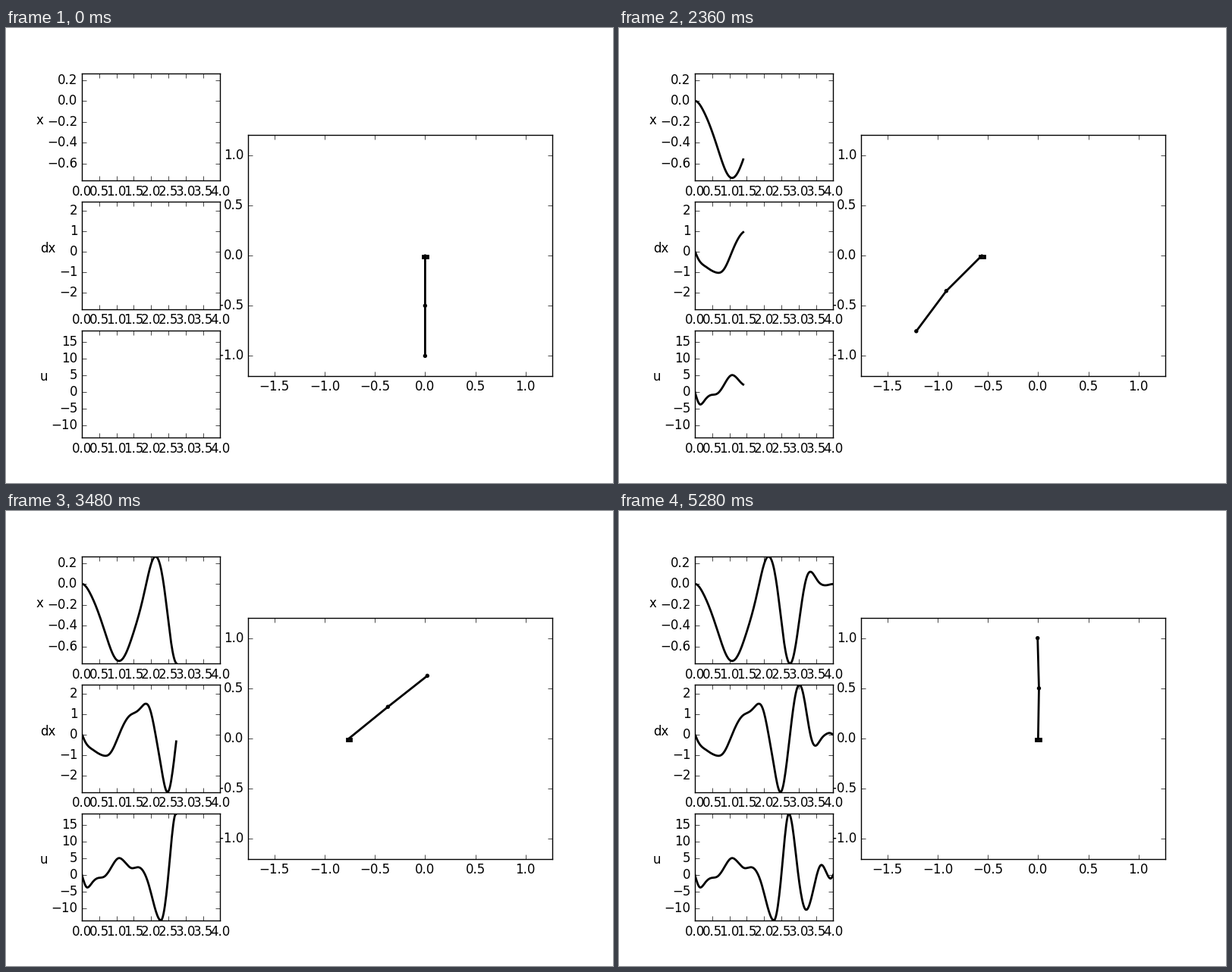
A matplotlib script that plays this animation: 800x600 px, repeating every 5.76 s.

```python
import numpy as np
import matplotlib.pyplot as plt
from matplotlib.animation import FuncAnimation
from matplotlib.patches import Circle, Rectangle

plt.style.use("classic")
plt.rcParams.update({"figure.facecolor": "white", "font.family": "DejaVu Sans"})

FRAMES, INTERVAL = 144, 40
START, LAST_STEP = 30, 85
END, N = 4.0, 201
ROD, GRAVITY = 0.5, 9.81
T, DT = np.linspace(0, END, N, retstep=True)


def sampler(times):
    """Matrix that reads a gridded signal at the given times."""
    return np.maximum(0, 1 - np.abs(np.subtract.outer(times, T)) / DT)


def smooth_curve(turns, passes, slopes, order, tolerance):
    """Curve of least bending (derivative of the given order) that turns at,
    passes through, or has a given slope at a few key points."""
    derive = np.gradient(np.eye(N), DT, axis=0)
    slopes = slopes + [(t, 0) for t, _ in turns]
    rows = [2e-4 * np.diff(np.eye(N), order, axis=0) / DT**order]
    goals = [np.zeros(N - order)]
    for points, operator, allowed in ((turns + passes, np.eye(N), tolerance),
                                      (slopes, derive, 7 * tolerance)):
        times, values = np.array(points).T
        rows.append(sampler(times) @ operator / allowed)
        goals.append(values / allowed)
    return np.linalg.lstsq(np.vstack(rows), np.concatenate(goals), rcond=None)[0]


def swing_up(acceleration):
    """Angles of both rods (0 = hanging) that obey the double pendulum
    equations on the moving cart and pass through a few key poses."""
    keys = np.array([(0, 0, 0), (0.8275, 0.095, 0.514),
                     (1.92, -0.236, -0.979), (2.7275, 2.254, 2.239),
                     (3.345, 3.366, 3.194), (4, 3.125, 3.168)])
    read = sampler(keys[:, 0])
    poses = keys[:, 1:].T
    push = acceleration[1:-1]

    def motion(q):
        return (q[..., 1:-1], (q[..., 2:] - q[..., :-2]) / (2 * DT),
                (q[..., 2:] - 2 * q[..., 1:-1] + q[..., :-2]) / DT**2)

    def misfit(q):
        a, va, acc_a = motion(q[..., 0, :])
        b, vb, acc_b = motion(q[..., 1, :])
        c, s = np.cos(a - b), np.sin(a - b)
        upper = (2 * acc_a + c * acc_b + s * vb**2
                 + 2 / ROD * (GRAVITY * np.sin(a) + push * np.cos(a)))
        lower = (acc_b + c * acc_a - s * va**2
                 + 1 / ROD * (GRAVITY * np.sin(b) + push * np.cos(b)))
        pose = (q @ read.T - poses) / 0.002
        rest = (q[..., [1, -1]] - q[..., [0, -2]]) / 0.004
        flat = q.shape[:-2] + (-1,)
        return np.concatenate([upper / 2, lower / 2, pose.reshape(flat),
                               rest.reshape(flat)], axis=-1)

    # Levenberg-Marquardt from straight lines between the poses.
    q = np.concatenate([np.interp(T, keys[:, 0], angle) for angle in poses])
    size, nudge, damping = 2 * N, 1e-6, 10.0
    error = misfit(q.reshape(2, N))
    jacobian = None
    for _ in range(60):
        if jacobian is None:
            moved = (q + nudge * np.eye(size)).reshape(size, 2, N)
            jacobian = (misfit(moved) - error).T / nudge
            normal, slope = jacobian.T @ jacobian, jacobian.T @ error
        step = np.linalg.solve(normal + damping * np.eye(size), -slope)
        trial = misfit((q + step).reshape(2, N))
        if trial @ trial < error @ error:
            q, error, jacobian = q + step, trial, None
            damping /= 5
            if np.abs(step).max() < 1e-4:
                break
        else:
            damping *= 4
    return q.reshape(2, N)


x = smooth_curve(
    turns=[(0, 0), (1.075, -0.737), (2.13, 0.264), (2.75, -0.762),
           (3.34, 0.118), (3.77, -0.012), (4, 0)],
    passes=[(0.83, -0.62), (1.92, 0.09)],
    slopes=[(0.3, -0.71), (0.62, -1.01), (1.4, 0.95), (1.8, 1.47),
            (2.48, -2.78), (3, 2.4), (3.5, -0.53)],
    order=4, tolerance=0.003)
dx = np.gradient(x, DT)
u = smooth_curve(
    turns=[(0.16, -3.8), (1.08, 5.05), (1.46, 2), (1.62, 2.3), (2.28, -13.7),
           (2.72, 18.4), (3.22, -10.5), (3.66, 3), (3.92, -1.1)],
    passes=[(0, 0), (0.3, -2.3), (0.45, -1), (0.65, -0.5), (0.83, 1.9),
            (1.92, -2.5), (2.5, 0), (2.99, 0), (4, 0)],
    slopes=[], order=2, tolerance=0.1)
phi1, phi2 = swing_up(np.gradient(dx, DT))

fig = plt.figure(figsize=(8, 6), dpi=100)
grid = fig.add_gridspec(3, 3)

stage = fig.add_subplot(grid[:, 1:])
stage.set_aspect("equal")
stage.set(xlim=(-1.764, 1.266), ylim=(-1.2, 1.2),
          xticks=np.arange(-1.5, 1.1, 0.5), yticks=np.arange(-1, 1.1, 0.5))

curves = []
for row, (name, data, limits, ticks) in enumerate((
        ("x", x, (-0.762, 0.264), np.arange(-3, 2) / 5),
        ("dx", dx, (-2.78, 2.41), np.arange(-2, 3)),
        ("u", u, (-13.7, 18.45), np.arange(-10, 16, 5)))):
    ax = fig.add_subplot(grid[row, 0])
    ax.set(xlim=(0, END), ylim=limits, yticks=ticks,
           xticks=np.arange(0, 4.1, 0.5))
    ax.set_ylabel(name, rotation="horizontal", ha="right", labelpad=3.2)
    line, = ax.plot([], [], "k", lw=2)
    curves.append((line, data))

cart = stage.add_patch(Rectangle((0, -0.02), 0.05, 0.02, facecolor="0.75",
                                 edgecolor="black", lw=2))
rods, = stage.plot([], [], "k", lw=2, solid_joinstyle="round")
joints = [stage.add_patch(Circle((0, 0), radius, color="black"))
          for radius in (0.005, 0.015, 0.015)]


def draw(frame):
    step = min(frame - START, LAST_STEP)
    running = step >= 0
    now = min(0.02 + 0.0475 * step, END) if running else 0.0
    past = T < now - 1e-9
    for line, data in curves:
        if running:
            line.set_data(np.append(T[past], now),
                          np.append(data[past], np.interp(now, T, data)))
        else:
            line.set_data([], [])

    base, a, b = (np.interp(now, T, s) for s in (x, phi1, phi2))
    px = base + ROD * np.array([0, np.sin(a), np.sin(a) + np.sin(b)])
    py = -ROD * np.array([0, np.cos(a), np.cos(a) + np.cos(b)])
    cart.set_x(base - 0.025)
    rods.set_data(px, py)
    for joint, center in zip(joints, zip(px, py)):
        joint.center = center
    return [cart, rods, *joints, *(line for line, _ in curves)]


animation = FuncAnimation(fig, draw, frames=FRAMES, interval=INTERVAL,
                          init_func=lambda: draw(0), repeat=True,
                          repeat_delay=0, blit=False)
plt.show()
```
